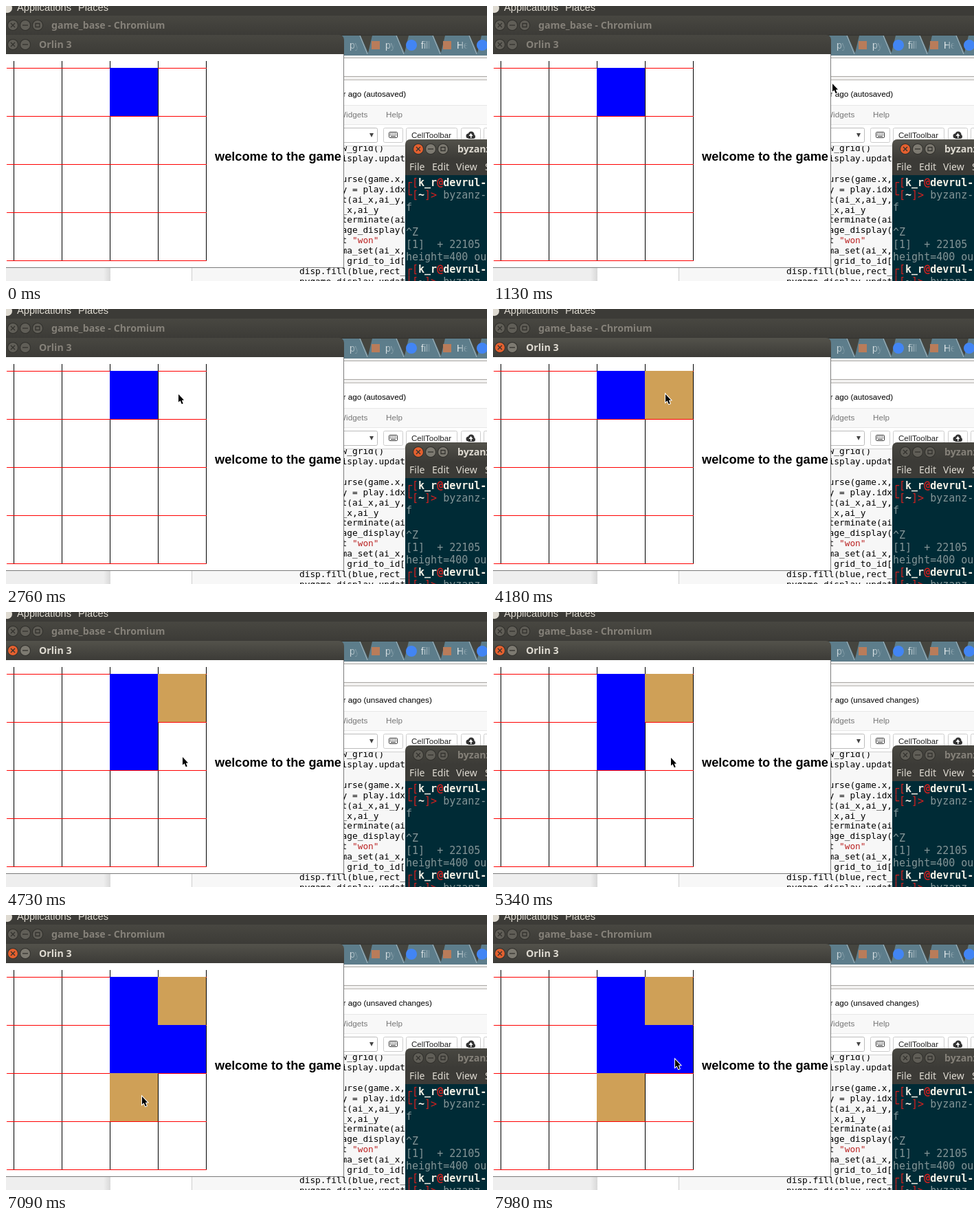
These frames come from a looping animation (700x400 px, 8000 ms). An HTML page with a canvas:

```html
<!DOCTYPE html>
<html lang="en">
<head>
<meta charset="utf-8">
<title>Board game desktop</title>
<style>
html, body { margin: 0; width: 100%; height: 100%; overflow: hidden; }
canvas { display: block; }
</style>
</head>
<body>
<canvas id="stage" width="700" height="400"></canvas>
<script>
const ctx = document.getElementById('stage').getContext('2d');
const LOOP = 8000, FOCUS = 4180, UNSAVED = 4410;
const SANS = '"Liberation Sans", sans-serif';
const UI = '"Noto Sans", sans-serif';
const MONO = '"DejaVu Sans Mono", monospace';
const BLUE = '#0000ff', TAN = '#cfa057', DARK = '#3c3b37', PALE = '#dfdbd2', DIM = '#858179';
const TEAL = '#5d7d8b';

// Cells: time of appearance, column, row, colour
const cells = [
  [0, 2, 0, BLUE], [FOCUS, 3, 0, TAN], [4570, 2, 1, BLUE],
  [7090, 3, 1, BLUE], [7090, 2, 2, TAN]
];

// Pointer moves: start, end, intervals, evenly timed waypoints
const moves = [
  [1130, 1410, 7, [[494, 113], [300, 140], [170, 156], [101, 159]]],
  [1730, 1810, 2, [[140, 174], [190, 200], [224, 217]]],
  [1980, 2260, 6, [[226, 205], [235, 160], [239, 110], [236, 90]]],
  [2470, 2590, 3, [[239, 97], [246, 112], [250, 121], [251, 124]]],
  [4570, 4850, 7, [[252, 134], [256, 188], [257, 220], [250, 231]]],
  [5140, 5380, 5, [[251, 233], [257, 222], [261, 205]]],
  [6460, 6740, 7, [[250, 219], [222, 246], [205, 258], [198, 264]]],
  [7570, 7980, 8, [[197, 269], [205, 258], [235, 228], [265, 210]]]
];

const codeLines = [
  [8, 'w_grid()'], [8, 'isplay.update()'], [8, ''], [8, 'urse(game.x,game.y)'],
  [8, 'y = play.idx'], [8, 't(ai_x,ai_y,1)'], [8, '_x,ai_y'], [8, 'terminate(ai_x)'],
  [8, 'age_display(s)'], [8, 't'], [8, 'ma_set(ai_x,ai_y)'], [9, 'grid_to_id[ai]'],
  [0, 'disp.fill(blue,rect_l)'], [0, 'pygame.display.update()']
];

function rect(x, y, w, h, color) {
  ctx.fillStyle = color;
  ctx.fillRect(x, y, w, h);
}

function fade(x0, y0, x1, y1, from, to) {
  const shade = ctx.createLinearGradient(x0, y0, x1, y1);
  shade.addColorStop(0, from);
  shade.addColorStop(1, to);
  return shade;
}

function box(x, y, w, h, fill, border, radius = 2) {
  ctx.beginPath();
  ctx.roundRect(x + .5, y + .5, w, h, radius);
  ctx.fillStyle = fill;
  ctx.fill();
  ctx.lineWidth = 1;
  ctx.strokeStyle = border;
  ctx.stroke();
}

function poly(points, color) {
  ctx.beginPath();
  points.forEach(([x, y]) => ctx.lineTo(x, y));
  ctx.closePath();
  ctx.fillStyle = color;
  ctx.fill();
}

function disc(x, y, r, color) {
  ctx.beginPath();
  ctx.arc(x, y, r, 0, 7);
  ctx.fillStyle = color;
  ctx.fill();
}

function text(string, x, y, font, color) {
  ctx.font = font;
  ctx.fillStyle = color;
  ctx.fillText(string, x, y);
}

function titleBar(x, y, w, radii, title, titleX, buttons, focused) {
  ctx.beginPath();
  ctx.roundRect(x, y, w, 28, radii);
  ctx.fillStyle = fade(0, y, 0, y + 28, focused ? '#53524b' : '#484741', DARK);
  ctx.fill();
  for (let i = 0; i < buttons; i++) button(x + 10 + (x ? 9 : 0) + i * 18, y + 14, i, focused);
  text(title, titleX, y + 19, 'bold 14.2px ' + UI, focused ? PALE : DIM);
}

// Kind: 0 close, 1 minimise, 2 maximise
function button(x, y, kind, focused) {
  disc(x, y, 8, '#32312d');
  disc(x, y, 7, !focused ? '#605e57' : kind ? '#7d7a71' : '#e4602f');
  ctx.lineWidth = 1.3;
  ctx.strokeStyle = '#33322e';
  ctx.beginPath();
  if (kind === 0) {
    ctx.moveTo(x - 3, y - 3); ctx.lineTo(x + 3, y + 3);
    ctx.moveTo(x + 3, y - 3); ctx.lineTo(x - 3, y + 3);
  } else if (kind === 1) {
    ctx.moveTo(x - 4, y); ctx.lineTo(x + 4, y);
  } else {
    ctx.rect(x - 3, y - 2.5, 6, 5);
  }
  ctx.stroke();
}

function drawTabs() {
  rect(480, 42, 220, 30, TEAL);
  rect(480, 42, 220, 1, '#34332f');
  ['py', 'py', 'fill', 'He'].forEach((label, i) => {
    const x = 500 + i * 52;
    const edge = x + 16 + i;
    text(label, x, 62, '14px ' + SANS, '#eef2f3');
    rect(edge - 18, 44, 18, 25, fade(edge - 18, 0, edge - 3, 0, TEAL + '00', TEAL));
    poly([[edge, 43], [edge + 17, 43], [edge + 11, 68]], '#45453f');
    ctx.beginPath();
    ctx.moveTo(edge - 1, 43);
    ctx.lineTo(edge + 10, 70);
    ctx.strokeStyle = '#a9b9c0';
    ctx.lineWidth = 1;
    ctx.stroke();
    if (i % 2) disc(590 + (i - 1) * 51.5, 57, 8, '#4285f4');
    else rect(532 + i * 52, 51, 12, 12, '#b97c5a');
  });
}

function drawBrowser(t) {
  titleBar(0, 14, 700, 0, 'game_base - Chromium', 66, 3, false);
  rect(0, 70, 700, 330, '#fff');
  rect(480, 70, 220, 38, '#f2f1f0');
  drawTabs();
  rect(480, 75, 220, 28, '#aaa8a4');
  rect(480, 76, 220, 26, '#fff');
  rect(480, 107, 220, 1, '#b5b3af');

  const status = t < UNSAVED ? 'autosaved' : 'unsaved changes';
  text(`r ago (${status})`, 490.5, 132, '11.7px ' + SANS, '#000');
  rect(480, 144, 220, 29, '#e7e7e7');
  rect(480, 145, 220, 27, '#f8f8f8');
  text('Widgets', 484, 162, '11.7px ' + SANS, '#777');
  text('Help', 553, 162, '11.7px ' + SANS, '#777');

  box(440, 177, 100, 21, '#fff', '#bbb');
  poly([[529, 185], [535, 185], [532, 191]], '#444');
  box(549, 177, 28, 21, '#fff', '#ccc');
  box(582, 177, 74, 21, '#fff', '#ccc');
  box(662, 177, 28, 21, '#fff', '#ccc');
  box(695, 177, 28, 21, '#fff', '#ccc');
  text('CellToolbar', 590, 192, '11.6px ' + SANS, '#222');
  box(557, 183, 12, 8, '#fff', '#333', 1);
  for (let i = 0; i < 8; i++) rect(559 + i % 4 * 2.5, 185 + (i >> 2) * 2, 1.3, 1, '#333');
  rect(560, 189, 7, 1, '#333');
  disc(673, 189, 3.5, '#333');
  disc(677, 187, 4.5, '#333');
  disc(680, 190, 3, '#333');
  rect(673, 189, 7, 4, '#333');
  poly([[676.5, 185], [679.5, 189], [673.5, 189]], '#fff');
  rect(676, 188, 1.5, 4, '#fff');

  rect(0, 203, 152, 197, fade(142, 0, 152, 0, '#eee', '#d8d8d8'));
  rect(270, 203, 430, 197, '#cfcfcf');
  rect(271, 204, 429, 196, '#f7f7f7');
  ctx.save();
  ctx.beginPath();
  ctx.rect(271, 204, 429, 196);
  ctx.clip();
  const font = '12.8px ' + MONO;
  codeLines.forEach(([column, line], i) =>
    text(line, 427 + column * 7.7, 211 + i * 14.92, font, '#000'));
  text('"won"', 504, 345.3, font, '#ba2121');
  ctx.restore();
}

function terminalLine(y, ...parts) {
  let column = 0;
  for (const [string, color, weight = ''] of parts) {
    text(string, 582 + column * 9.03, y, `${weight} 15px ${MONO}`, color);
    column += string.length;
  }
}

function drawPrompt(y) {
  const red = '#d3201f', light = '#f4f1e6';
  terminalLine(y, ['┌[', red], ['k_r', light, 'bold'], ['@', red, 'bold'], ['devrul-', light, 'bold']);
  terminalLine(y + 18, ['└[', red], ['~', light, 'bold'], [']>', red], [' byzanz-', '#839496']);
}

function drawTerminal(t) {
  rect(581, 204, 119, 196, '#002b36');
  titleBar(581, 194, 130, [7, 0, 0, 0], 'byzanz-record', 657, 3, t < FOCUS);
  rect(581, 222, 119, 24, DARK);
  [['File', 587], ['Edit', 620], ['View', 655], ['Search', 697]].forEach(([label, x]) =>
    text(label, x, 239, '14px ' + UI, PALE));
  drawPrompt(262);
  drawPrompt(388);
  [[298, 'f'], [334, '^Z'], [352, '[1]  + 22105'], [370, 'height=400 ou']].forEach(([y, line]) =>
    terminalLine(y, [line, '#839496']));
}

function drawGame(t) {
  rect(0, 70, 492, 311, '#7b7b7b');
  rect(0, 70, 491, 310, '#fff');
  titleBar(0, 42, 492, [0, 7, 0, 0], 'Orlin 3', 48, 2, t >= FOCUS);
  for (let i = 0; i < 5; i++) rect(11 + i * 70, 80, 1, 291, '#000');
  for (let i = 0; i < 5; i++) rect(1, 90 + i * 70, 291, 1, '#f00');
  for (const [time, column, row, color] of cells)
    if (t >= time) rect(11 + column * 70, 90 + row * 70, 70, 70, color);
  text('welcome to the game', 304, 225, 'bold 18.2px ' + SANS, '#000');
}

function pointerAt(t) {
  const move = moves.findLast(([start]) => t >= start);
  if (!move) return null;
  const [start, end, count, points] = move;
  const step = Math.min(count, Math.floor((t - start) / (end - start) * count + 1e-6));
  const place = step / count * (points.length - 1);
  const i = Math.min(points.length - 2, Math.floor(place));
  return points[i].map((v, axis) => Math.round(v + (points[i + 1][axis] - v) * (place - i)));
}

function drawPointer(t) {
  const tip = pointerAt(t);
  if (!tip) return;
  const outline = [[0, 0], [0, 11.5], [2.6, 9.2], [4.8, 14.2], [6.7, 13.4], [4.8, 8.7], [8, 8.4]];
  const points = outline.map(([x, y]) => [tip[0] + x, tip[1] + y]);
  poly(points, '#000');
  ctx.lineWidth = 2;
  ctx.strokeStyle = '#fff';
  ctx.stroke();
  poly(points, '#000');
}

function draw(t) {
  rect(0, 0, 700, 400, DARK);
  disc(2, 3, 7, PALE);
  text('Applications', 16, 7, '14.67px ' + SANS, PALE);
  text('Places', 105, 7, '14.67px ' + SANS, PALE);
  drawBrowser(t);
  drawGame(t);
  drawTerminal(t);
  drawPointer(t);
}

const began = performance.now();
function tick() {
  draw((performance.now() - began) % LOOP);
  requestAnimationFrame(tick);
}
tick();
</script>
</body>
</html>
```
